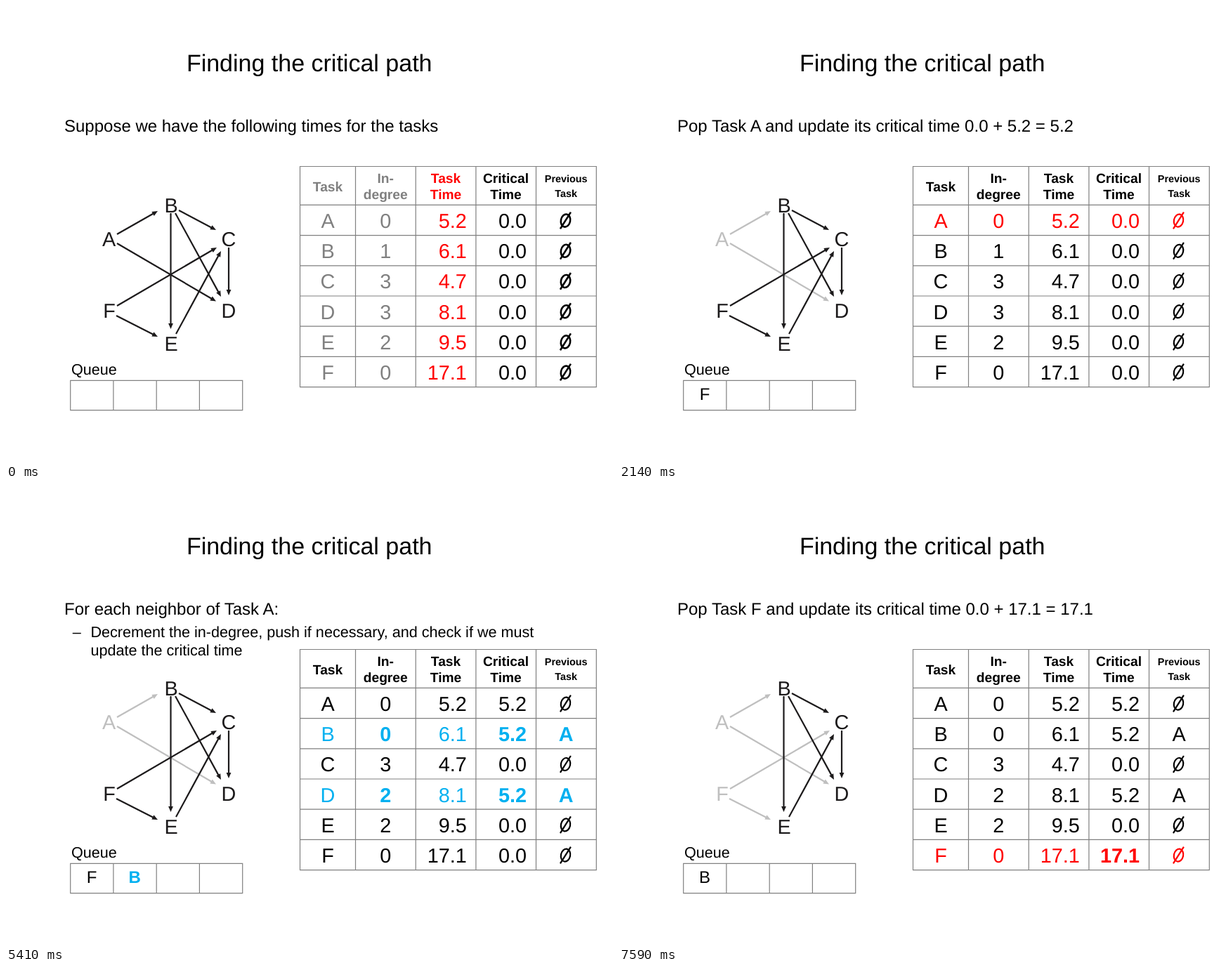
An HTML page for the animation above (8 s loop, 864 by 648 pixels).

```html
<!DOCTYPE html>
<html lang="en">
<head>
<meta charset="utf-8">
<title>Finding the critical path</title>
<style>
  html, body { margin: 0; width: 100%; height: 100%; overflow: hidden; background: #fff; }
  svg { display: block; width: 864px; height: 648px; }
  text { font-family: "Liberation Sans", Arial, sans-serif; font-kerning: normal; text-rendering: geometricPrecision; }
</style>
</head>
<body>
<svg id="stage" viewBox="0 0 864 648"></svg>
<script>
const LOOP = 8000;
const BLACK = '#000', RED = '#f00', BLUE = '#00b0f0', GRAY = '#808080', FADED = '#bfbfbf', INK = '#1c1a1b';
const ROW = 43.2;

const popText = (task, time) => `Pop Task ${task} and update its critical time 0.0 + ${time} = ${time}`;
const neighbors = {
  text: 'For each neighbor of Task A:',
  bullets: ['Decrement the in-degree, push if necessary, and check if we must', 'update the critical time'],
  rows: { B: BLUE, D: BLUE }, done: 'A'
};

// In `cells` and `queue`, a trailing * marks bold text. Cell changes persist in later steps.
const steps = [
  { at: 0, text: 'Suppose we have the following times for the tasks', rows: {}, done: '', queue: [], intro: true },
  { at: 1050, text: 'So we initialize the queue with those vertices with in-degree zero',
    rows: { A: RED, F: RED }, done: '', queue: ['A*', 'F*'], queueColor: [RED, RED],
    cells: { A: { degree: '0*' }, F: { degree: '0*' } } },
  { at: 2140, text: popText('A', '5.2'), rows: { A: RED }, done: 'A', queue: ['F'] },
  { at: 3230, text: popText('A', '5.2'), rows: { A: RED }, done: 'A', queue: ['F'],
    cells: { A: { critical: '5.2*' } } },
  { at: 4320, ...neighbors, queue: ['F'] },
  { at: 5410, ...neighbors, queue: ['F', 'B*'], queueColor: [BLACK, BLUE],
    cells: { B: { degree: '0*', critical: '5.2*', previous: 'A*' },
             D: { degree: '2*', critical: '5.2*', previous: 'A*' } } },
  { at: 6500, text: popText('F', '17.1'), rows: { F: RED }, done: 'AF', queue: ['B'] },
  { at: 7590, text: popText('F', '17.1'), rows: { F: RED }, done: 'AF', queue: ['B'],
    cells: { F: { critical: '17.1*' } } }
];

const degrees = { A: 0, B: 1, C: 3, D: 3, E: 2, F: 0 };
const times = { A: '5.2', B: '6.1', C: '4.7', D: '8.1', E: '9.5', F: '17.1' };
const vertices = { A: [146.5, 341.5], B: [235, 294], C: [317, 341.5], D: [317, 443.5], E: [235, 491], F: [147, 443.5] };
const edges = [
  ['A', 158, 325, 216, 292], ['A', 158, 338, 299, 420.5],
  ['F', 158, 427, 300, 344], ['F', 157, 441, 216, 471],
  ['B', 246, 291, 299, 319], ['B', 241, 295, 306, 414], ['B', 234.5, 295, 234.5, 460],
  ['C', 317, 344, 317, 412], ['E', 242, 467, 306, 349]
];
const columns = [
  { key: 'task', x: 458, anchor: 'middle' },
  { key: 'degree', x: 540.2, anchor: 'middle' },
  { key: 'time', x: 655.8, anchor: 'end' },
  { key: 'critical', x: 741, anchor: 'end' },
  { key: 'previous', x: 797.2, anchor: 'middle' }
];

function text(content, x, y, size, { color = BLACK, anchor = 'start' } = {}) {
  const bold = content.endsWith('*');
  return `<text x="${x}" y="${y}" font-size="${size}" fill="${color}" text-anchor="${anchor}"` +
    `${bold ? ' font-weight="700"' : ''}>${bold ? content.slice(0, -1) : content}</text>`;
}

function grid(xs, ys) {
  const [left, right, top, bottom] = [xs[0], xs.at(-1), ys[0], ys.at(-1)];
  const path = xs.map(x => `M${x} ${top}V${bottom}`).join('') + ys.map(y => `M${left} ${y}H${right}`).join('');
  return `<path d="${path}" fill="none" stroke="${GRAY}" stroke-width="1.2" stroke-linecap="square"/>`;
}

function arrow(x1, y1, x2, y2, color) {
  const angle = Math.atan2(y2 - y1, x2 - x1) * 180 / Math.PI;
  const length = Math.hypot(x2 - x1, y2 - y1);
  return `<g transform="translate(${x1} ${y1}) rotate(${angle})">` +
    `<path d="M0 0H${length - 5}" stroke="${color}" stroke-width="2.2"/>` +
    `<path d="M${length} 0l-8 -3.4v6.8z" fill="${color}"/></g>`;
}

function emptySet(x, baseline, color, weight) {
  return `<g transform="translate(${x - 0.7} ${baseline - 10.4})" fill="none" stroke="${color}" stroke-width="${weight}">` +
    `<ellipse rx="6.6" ry="9.1" transform="rotate(12)"/><path d="M-7.6 11.8L7.4 -12"/></g>`;
}

function graph(done) {
  const color = v => done.includes(v) ? FADED : INK;
  const fadedFirst = [...edges].sort((a, b) => done.includes(b[0]) - done.includes(a[0]));
  return fadedFirst.map(([from, ...ends]) => arrow(...ends, color(from))).join('') +
    Object.entries(vertices).map(([v, [x, y]]) => text(v, x, y, 28.8, { color: color(v), anchor: 'middle' })).join('');
}

function header(intro) {
  const center = (label, x, y, size, color) => text(label + '*', x, y, size, { color, anchor: 'middle' });
  const muted = intro ? GRAY : BLACK, accent = intro ? RED : BLACK;
  return center('Task', 458, 263.5, 19.2, muted) +
    center('In-', 540.2, 251.5, 19.2, muted) + center('degree', 540.2, 274.8, 19.2, muted) +
    center('Task', 626, 251.5, 19.2, accent) + center('Time', 626, 274.8, 19.2, accent) +
    center('Critical', 711.5, 251.5, 19.2) + center('Time', 711.5, 274.8, 19.2) +
    center('Previous', 797.2, 250.7, 14.4) + center('Task', 797.2, 272, 14.4);
}

function cellsAt(index, task) {
  const row = { task, degree: String(degrees[task]), time: times[task], critical: '0.0', previous: '∅' };
  for (let i = 0; i <= index; i++) {
    const change = steps[i].cells?.[task] ?? {};
    for (const key in change) row[key] = i === index ? change[key] : change[key].replace('*', '');
  }
  return row;
}

function table(index) {
  const { rows, intro } = steps[index];
  const introColors = [GRAY, GRAY, RED, BLACK, BLACK];
  const lines = [228.5, ...Array.from({ length: 7 }, (_, i) => 283.4 + i * ROW)];
  let out = grid([418.5, 497.5, 583.2, 668.9, 754.5, 840.3], lines) + header(intro);
  Object.keys(degrees).forEach((task, r) => {
    const row = cellsAt(index, task), y = 316 + r * ROW;
    columns.forEach(({ key, x, anchor }, c) => {
      const color = intro ? introColors[c] : rows[task] ?? BLACK;
      out += row[key] === '∅' ? emptySet(x, y, color, intro ? 2.6 : 2.2) : text(row[key], x, y, 28.8, { color, anchor });
    });
  });
  return out;
}

function queue({ queue: items, queueColor = [] }) {
  return text('Queue', 93, 525.3, 21.6) + grid([91.7, 152.9, 214.2, 275.4, 336.7], [533.3, 575.6]) +
    items.map((item, i) => text(item, 122 + i * 61.2, 560.8, 24, { color: queueColor[i], anchor: 'middle' })).join('');
}

function scene(index) {
  const step = steps[index];
  const bullets = step.bullets ?? [];
  return text('Finding the critical path', 431.7, 92.6, 34, { anchor: 'middle' }) +
    text(step.text, 83, 179, 24) +
    (bullets.length ? text('–', 94.8, 211, 21.6) : '') +
    bullets.map((line, i) => text(line, 120.4, 211 + i * 25.9, 21.6)).join('') +
    graph(step.done) + queue(step) + table(index);
}

const stage = document.getElementById('stage');
const start = performance.now();
let shown = -1;

function draw() {
  const t = (performance.now() - start) % LOOP;
  const index = steps.findLastIndex(step => step.at <= t);
  if (index !== shown) stage.innerHTML = scene(shown = index);
  requestAnimationFrame(draw);
}
draw();
</script>
</body>
</html>
```
